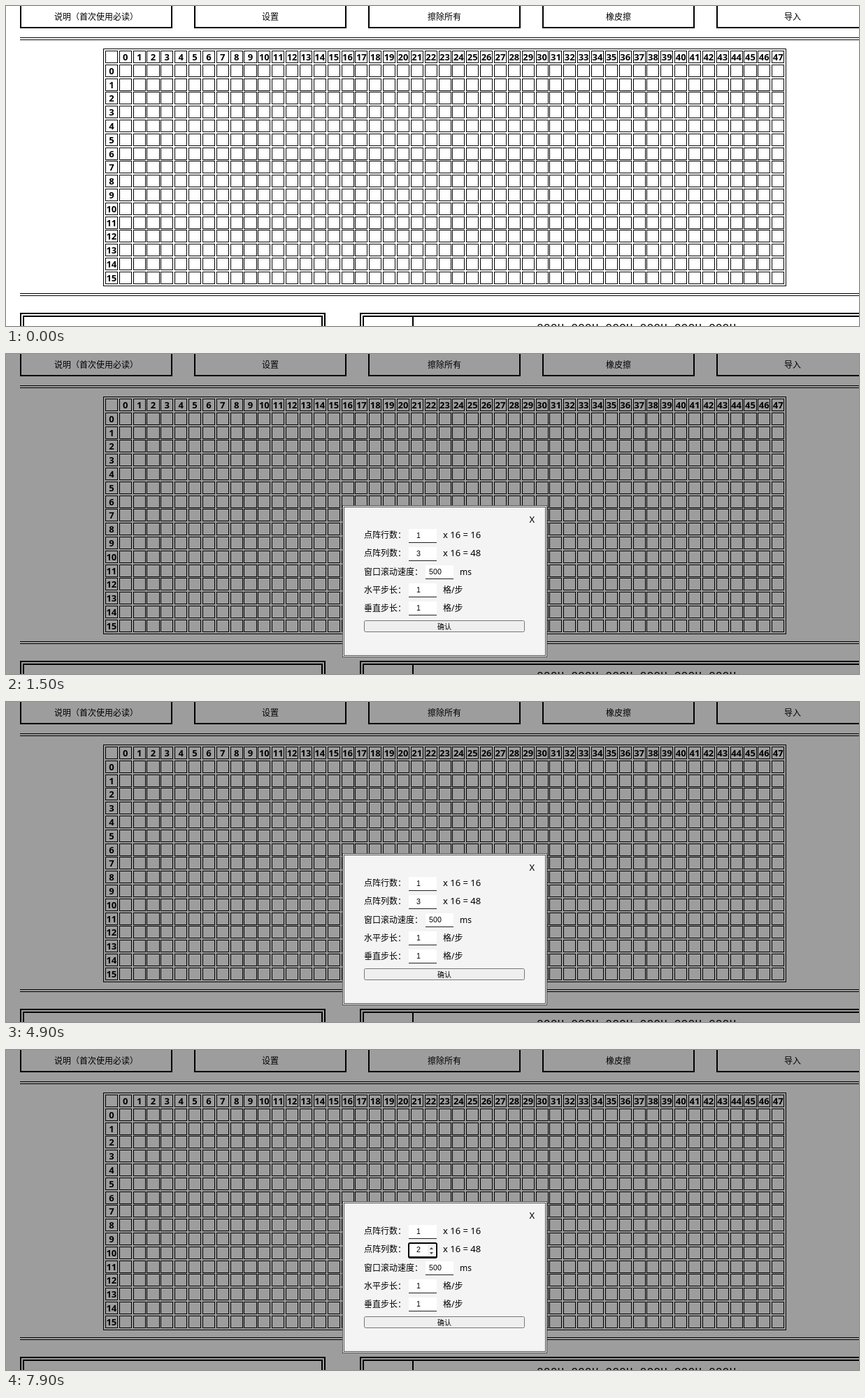
Write an HTML page that moves like this. It is 1220 by 459 pixels and loops after 8000 ms.

```html
<!DOCTYPE html>
<html lang="zh-CN">
<head>
<meta charset="utf-8">
<style>
  html, body { margin: 0; width: 100%; height: 100%; overflow: hidden; background: #fff; }
  svg { display: block; width: 1220px; height: 459px; }
  text { font: 12px "Noto Sans", "Noto Sans CJK SC", "Noto Sans CJK", sans-serif; white-space: pre; }
  .mid { text-anchor: middle; }
  .head { font-weight: 700; font-size: 13px; }
  .latin { font-size: 13px; }
  .small { font-size: 10px; }
  .value { font: 10.67px "Liberation Sans", sans-serif; text-anchor: middle; }
  .mono { font: 16.4px "Liberation Mono", monospace; }
  .line { fill: none; stroke: #000; }
  .edge { fill: none; stroke: #505050; }
  .push { fill: #efefef; stroke: #767676; }
  .thick { fill: none; stroke: #000; stroke-width: 2; }
</style>
</head>
<body>
<svg id="stage" viewBox="0 0 1220 459"></svg>
<script>
const LOOP = 8000;
const BLUE = '#3390ff';
const stage = document.getElementById('stage');
const timed = [];

function add(parent, tag, attrs, text) {
  const el = document.createElementNS('http://www.w3.org/2000/svg', tag);
  for (const key in attrs) el.setAttribute(key, attrs[key]);
  if (text !== undefined) el.textContent = text;
  return parent.appendChild(el);
}
const box = (parent, x, y, width, height, fill = '#000') =>
  add(parent, 'rect', { x, y, width, height, fill });
const frame = (parent, x, y, width, height, cls = 'line', rx = 0) =>
  add(parent, 'rect', { x, y, width, height, class: cls, rx });
const label = (parent, x, y, text, cls = '', fill = '#000') =>
  add(parent, 'text', { x, y, class: cls, fill }, text);

// Shows an element only inside the given [start, end) spans.
function during(el, ...spans) {
  timed.push({ el, spans });
  return el;
}
const group = (parent, ...spans) => during(add(parent, 'g', {}), ...spans);

// Toolbar
const buttons = ['说明（首次使用必读）', '设置', '擦除所有', '橡皮擦', '导入'].map((name, i) => {
  const x = 20 + 249 * i;
  const face = frame(stage, x + 1, -20, 216, 51, 'thick');
  return { face, text: label(stage, x + 109, 19.5, name, 'mid') };
});
const settings = buttons[1];

for (const y of [45, 412]) {
  box(stage, 20, y, 1200, 1);
  box(stage, 20, y + 3, 1200, 1);
}

// Dot matrix: fractional pitch, edges snapped to whole pixels
const colX = i => 161.75 + 19.86 * i;
const rowY = j => 83.8 + 19.8 * j;
function cell(i, j) {
  const x = Math.round(colX(i)), y = Math.round(rowY(j));
  return { x, y, width: Math.round(colX(i) + 18.06) - x, height: 18 };
}
frame(stage, 139.5, 61.5, 976, 340);
const hoverSteps = [[42, 5], [32, 3], [22, 2], [12, 0]];
hoverSteps.forEach(([i, j], n) => {
  const { x, y, width, height } = cell(i, j);
  during(box(stage, x, y, width, height, '#808080'), [100 + 100 * n, 200 + 100 * n]);
});
for (let j = -1; j < 16; j++) {
  for (let i = -1; i < 48; i++) {
    const { x, y, width, height } = cell(i, j);
    frame(stage, x + .5, y + .5, width - 1, height - 1);
    if ((i < 0) !== (j < 0)) label(stage, colX(i) + 9, y + 14, Math.max(i, j), 'head mid');
  }
}

// Lower panels
for (const [x, width] of [[20, 437], [506, 800]]) {
  frame(stage, x + 1, 441, width - 2, 60, 'thick');
  frame(stage, x + 5, 445, width - 10, 60, 'thick');
}
box(stage, 581, 446, 2, 20);
label(stage, 759, 466.5, Array(6).fill('000H').join(' '), 'mono');

// Dialog; its shade surrounds it but does not lie beneath it
const dialog = add(stage, 'g', {});
add(dialog, 'path', { d: 'M0 0H1220V459H0ZM481 217V435H774V217Z', 'fill-rule': 'evenodd', fill: 'rgba(0,0,0,.384)' });
box(dialog, 481, 217, 293, 218, '#f4f4f4');
frame(dialog, 481.5, 217.5, 292, 217, 'edge');
frame(dialog, 483.5, 219.5, 288, 213, 'edge');
label(dialog, 748.5, 242, 'X', 'latin');

const rows = [
  { name: '点阵行数：', value: '1', unit: 'x 16 = 16', x: 576 },
  { name: '点阵列数：', value: '3', unit: 'x 16 = 48', x: 576 },
  { name: '窗口滚动速度：', value: '500', unit: 'ms', x: 600 },
  { name: '水平步长：', value: '1', unit: '格/步', x: 576 },
  { name: '垂直步长：', value: '1', unit: '格/步', x: 576 }
];
rows.forEach((row, i) => {
  row.y = 251 + 26 * i;
  row.base = 264.3 + 26.1 * i;
  row.unitClass = row.unit[0] === 'x' ? 'latin' : '';
  label(dialog, 512, row.base, row.name);
  box(dialog, row.x, row.y, 40, 19, '#fff');
  box(dialog, row.x, row.y + 19, 40, 1, '#222');
  row.valueText = label(dialog, row.x + 14, row.y + 13, row.value, 'value');
  label(dialog, row.x + 49, row.base, row.unit, row.unitClass);
});

frame(dialog, 512.5, 382.5, 229, 16, 'push', 2);
label(dialog, 627, 394.7, '确认', 'small mid');

function spinner(row, ...spans) {
  const g = group(dialog, ...spans);
  const { y } = row;
  box(g, 603, y + 2, 11, 16, '#f3f3f3');
  during(box(g, 603, y + 1, 11, 8, '#d4d4d4'), [2400, 2500]);
  add(g, 'path', { d: `M606 ${y + 9}h5l-2.5-3zM606 ${y + 13}h5l-2.5 3z`, fill: '#444' });
}
spinner(rows[0], [2300, 2600]);
spinner(rows[1], [3600, 3700], [5400, LOOP]);

// Text selection, one piece at a time
function selectUnit(row, end, span) {
  const g = group(dialog, span);
  box(g, 622, row.y, end - 622, 21, BLUE);
  label(g, 625, row.base, row.unit, row.unitClass, '#fff');
}
function selectValue(row, ...spans) {
  const g = group(dialog, ...spans);
  box(g, 587, row.y + 1, 8, 17, BLUE);
  label(g, 590, row.y + 13, row.value, 'value', '#fff');
}
function selectName(row, ...spans) {
  const g = group(dialog, ...spans);
  box(g, 512, row.y, 64, 21, BLUE);
  label(g, 512, row.base, row.name, '', '#fff');
}
selectUnit(rows[0], 679, [3100, 4100]);
selectValue(rows[0], [3200, 4100], [4300, 4900]);
selectName(rows[0], [3300, 4100], [4300, 4900]);
selectUnit(rows[0], 683, [4300, 4900]);
selectUnit(rows[1], 679, [4100, 4900]);
selectValue(rows[1], [4200, 4900]);
selectName(rows[1], [4200, 4900]);
const closeMark = group(dialog, [4400, 4900]);
box(closeMark, 748, 220, 12, 36, BLUE);
label(closeMark, 748.5, 242, 'X', 'latin', '#fff');

// Focused field and caret
during(frame(dialog, 576, 277, 40, 21, 'thick', 2), [5900, LOOP]);
during(box(dialog, 593, 281, 1, 12), [5900, 6400], [7400, 7900]);
during(box(dialog, 590, 281, 1, 12), [6900, 7400]);

function paintSettings(t) {
  let face = 255, ink = 0;
  if (t >= 700 && t < 800) [face, ink] = [128, 128];
  else if (t >= 800 && t < 1400) [face, ink] = [0, 255];
  else if (t >= 1400 && t < 1500) [face, ink] = [55, 200];
  settings.face.style.fill = `rgb(${face},${face},${face})`;
  settings.text.style.fill = `rgb(${ink},${ink},${ink})`;
}

function draw(t) {
  paintSettings(t);
  dialog.style.opacity = t < 1400 ? 0 : t < 1500 ? .47 : 1;
  rows[1].valueText.textContent = t < 6600 ? '3' : t < 7400 ? '' : '2';
  for (const { el, spans } of timed) {
    el.style.display = spans.some(([from, to]) => t >= from && t < to) ? '' : 'none';
  }
}

const start = performance.now();
function tick() {
  draw((performance.now() - start) % LOOP);
  requestAnimationFrame(tick);
}
tick();
</script>
</body>
</html>
```
